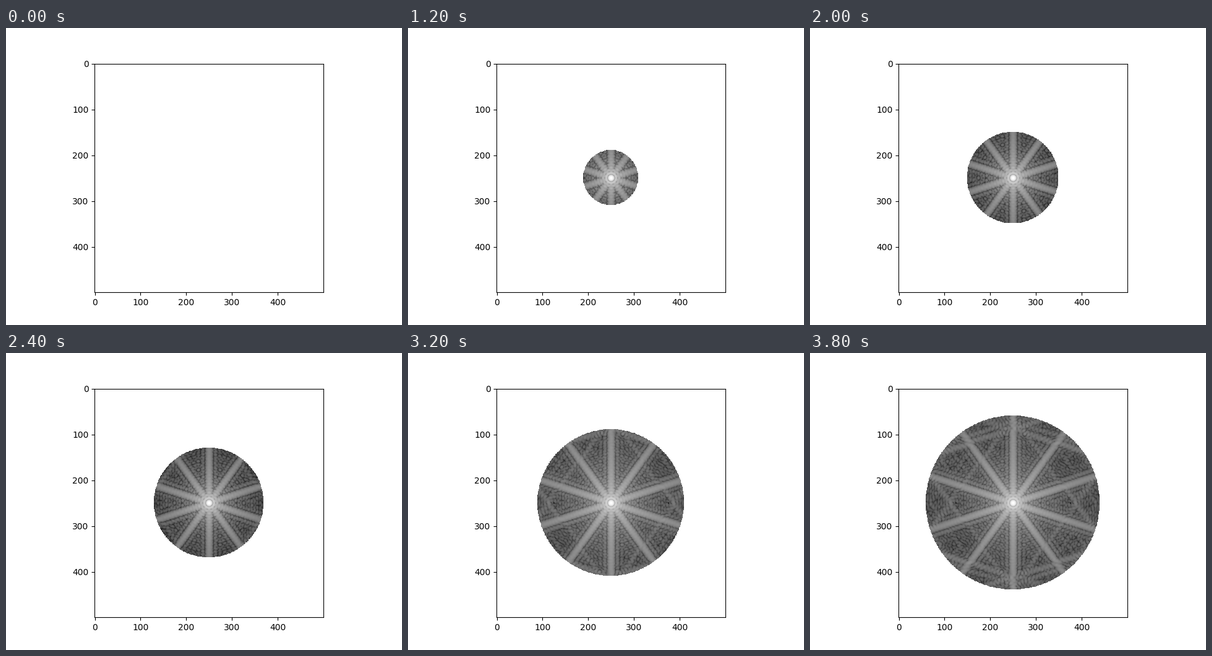
These frames come from a looping animation (640 px wide and 480 px high, 4 s). A matplotlib script:

```python
import numpy as np
import matplotlib.pyplot as plt
from matplotlib.animation import FuncAnimation

SIZE = 500
FRAMES = 20
STEP = 10          # radius growth per frame
SHAPE_RADIUS = 45
CENTER = 249       # centre of the circular window

rows, cols = np.mgrid[:SIZE, :SIZE]


def pentagon(cx, cy, radius):
    """Regular pentagon as the overlap of five half planes."""
    apothem = radius * np.cos(np.radians(36))
    angles = np.radians(90 + 72 * np.arange(5))
    return np.all(
        [(cols - cx) * np.cos(a) + (rows - cy) * np.sin(a) <= apothem
         for a in angles],
        axis=0,
    )


# Log spectrum of a white pentagon on black
picture = pentagon(249.8, 250.3, SHAPE_RADIUS).astype(float)
spectrum = np.log(np.abs(np.fft.fftshift(np.fft.fft2(picture))) + 1e-9)
distance = np.hypot(cols - CENTER, rows - CENTER)
peak = spectrum.max()
base = np.median(spectrum[distance < STEP * FRAMES])


def black_level(radius):
    """The darkest speckle gets deeper as the window takes in more of them."""
    depth = 4.6 if radius > 125 else 0.55 * np.log(radius) + 0.75
    return base - depth


def window(radius):
    return np.ma.masked_where(distance > radius, spectrum)


fig, ax = plt.subplots(figsize=(6.4, 4.8), dpi=100)
image = ax.imshow(window(1), cmap="gray", vmin=black_level(1), vmax=peak)


def update(frame):
    radius = 1 + STEP * frame
    image.set_data(window(radius))
    image.set_clim(black_level(radius), peak)
    return [image]


anim = FuncAnimation(fig, update, frames=FRAMES, interval=200,
                     repeat=True, repeat_delay=0)
plt.show()
```
